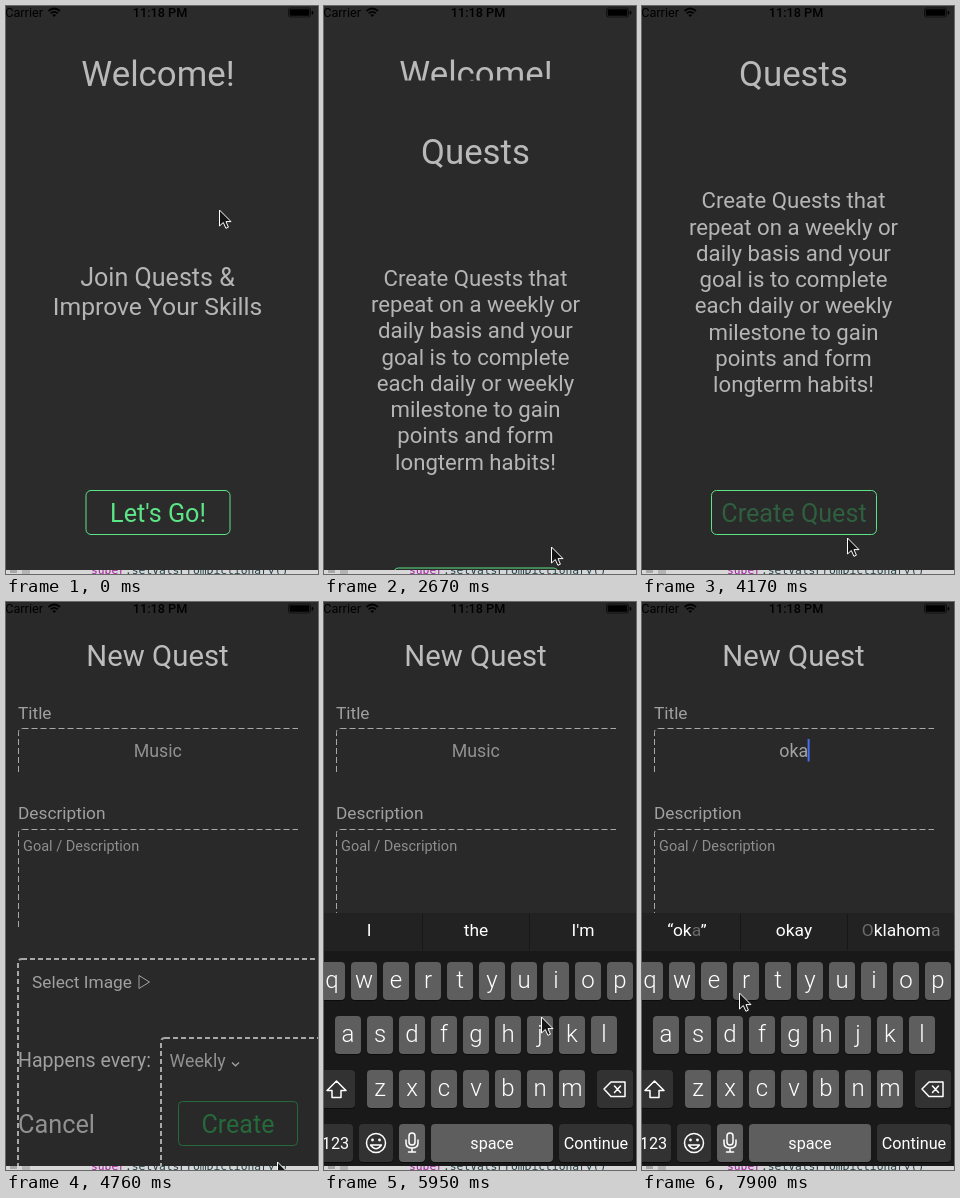
An HTML page for the animation above (8 s loop, 312x568 px).

```html
<!DOCTYPE html>
<html lang="en">
<head>
<meta charset="utf-8">
<title>Quest onboarding</title>
<style>
  html, body { margin: 0; width: 100%; height: 100%; overflow: hidden; background: #2b2b2b; }
  svg { display: block; width: 312px; height: 568px; }
  text { font-family: Roboto, Inter, sans-serif; fill: #b5b5b5; white-space: pre; }
  .mid { text-anchor: middle; }
  .h1 { font-size: 34.8px; fill: #b9b9b9; }
  .h2 { font-size: 29.3px; fill: #bcbcbc; }
  .lead { font-size: 24.7px; }
  .copy { font-size: 22.2px; }
  .label { font-size: 17.3px; fill: #a0a0a0; }
  .field { font-size: 17.8px; fill: #919191; }
  .hint { font-size: 14.5px; fill: #8e8e8e; }
  .button { font-size: 25.2px; fill: #5ce587; }
  .button.dim { fill: #2f5f3e; }
  .frame { fill: none; stroke: #5ce587; }
  .button.off { font-size: 25px; fill: #26693a; }
  .frame.off { fill: none; stroke: #26693a; }
  .thin { fill: none; stroke: #a8a8a8; stroke-dasharray: 6 3; }
  .thick { fill: none; stroke: #a8a8a8; stroke-width: 2; stroke-dasharray: 5 3; }
  .status text { fill: #000; font-size: 12.7px; }
  .key { fill: #5e5e5e; }
  .key.fn { fill: #323232; }
  .cap { fill: #fff; font-size: 24px; font-weight: 300; }
  .word { fill: #fff; font-size: 16.2px; }
  .tip { fill: #fff; font-size: 17.4px; }
  .faint { fill: #6b6b6b; }
  .icon { fill: none; stroke: #fff; stroke-width: 1.5; stroke-linejoin: round; stroke-linecap: round; }
  .code { font: 11.3px "DejaVu Sans Mono", "Liberation Mono", monospace; fill: #24434a; }
</style>
</head>
<body>
<svg viewBox="0 0 312 568">
  <defs>
    <clipPath id="screen"><rect width="312" height="564"/></clipPath>
    <clipPath id="below"><rect y="564" width="312" height="4"/></clipPath>
  </defs>

  <g clip-path="url(#below)">
    <rect y="564" width="312" height="4" fill="#d8d7d8"/>
    <rect x="4" y="564" width="7" height="3" fill="#a8a8a8"/>
    <rect x="16" y="564" width="8" height="4" fill="#b4b4b4"/>
    <text class="code" x="85" y="568"><tspan fill="#a51fa0">super</tspan>.setValsFromDictionary()</text>
  </g>

  <g clip-path="url(#screen)">
    <rect width="312" height="564" fill="#2b2b2b"/>
    <text class="h1 mid" x="152" y="80">Welcome!</text>
    <text class="lead mid" style="font-size:25.100px" x="151.500" y="279.500">Join Quests &amp;</text>
    <text class="lead mid" x="151.500" y="309.300">Improve Your Skills</text>
    <rect class="frame" x="80" y="484.500" width="144" height="44" rx="5"/>
    <text class="button mid" id="go" x="152" y="516">Let's Go!</text>

    <g id="quests">
      <rect x="-7" y="-3" width="320" height="568" fill="#2a2a2a"/>
      <text class="h1 mid" x="151.500" y="80">Quests</text>
      <g id="copy"></g>
      <rect class="frame" x="69.500" y="484.500" width="165" height="44" rx="5"/>
      <text class="button mid" id="add" x="152" y="516">Create Quest</text>
    </g>

    <g id="form">
      <rect x="-7" y="-3" width="320" height="568" fill="#292929"/>
      <text class="h2 mid" x="151.500" y="63.500">New Quest</text>
      <text class="label" x="12" y="117">Title</text>
      <path class="thin" d="M16.500 126.500H292M12.500 170V130.500Q12.500 126.500 16.500 126.500"/>
      <text class="field mid" id="title" x="151.700" y="154.500"></text>
      <rect id="caret" y="137" width="2" height="22.500" fill="#4a6cf0"/>
      <text class="label" x="12" y="217">Description</text>
      <path class="thin" d="M16.500 227.500H292M12.500 325V231.500Q12.500 227.500 16.500 227.500"/>
      <text class="hint" x="17" y="249">Goal / Description</text>
      <path class="thick" d="M16 357H316M12 566V361Q12 357 16 357"/>
      <text class="label" x="26" y="385.700">Select Image</text>
      <path d="M133 373.500V386.500L143.500 380Z" fill="none" stroke="#a0a0a0"/>
      <text class="label" style="font-size:19.500px" x="12" y="465">Happens every:</text>
      <path class="thick" d="M159 436H316M155 566V440Q155 436 159 436"/>
      <text class="field" x="163.500" y="465">Weekly</text>
      <path d="M226 460.500L229.500 463.800L233 460.500" fill="none" stroke="#a0a0a0" stroke-width="1.300"/>
      <text class="field" style="font-size:25.300px" x="12" y="531">Cancel</text>
      <rect class="frame off" x="172.500" y="499.500" width="119" height="44" rx="4"/>
      <text class="button off mid" x="232" y="531">Create</text>

      <g id="board">
        <rect x="-7" y="311" width="320" height="38" fill="#222"/>
        <rect x="-7" y="349" width="320" height="216" fill="#191919"/>
        <path d="M98.500 312V348M205.500 312V348" stroke="#171717"/>
        <g id="tips"></g>
        <g id="keys"></g>
        <path class="icon" d="M12.500 479L22 488.500H17V495.500H8V488.500H3Z"/>
        <path class="icon" d="M280 487L287 480H301V494.500H287ZM290.500 484L296.500 490.500M296.500 484L290.500 490.500"/>
        <circle class="icon" cx="52" cy="541" r="9.500"/>
        <path class="icon" d="M46.500 543Q52 550.500 57.500 543Z"/>
        <circle cx="48.500" cy="538" r="1.400" fill="#fff"/>
        <circle cx="55.500" cy="538" r="1.400" fill="#fff"/>
        <rect class="icon" x="85" y="531" width="6" height="12" rx="3"/>
        <path class="icon" d="M82 538V541Q82 546 88 546T94 541V538M88 546V550M84.500 550H91.500"/>
      </g>
    </g>

    <g class="status">
      <text x="37" y="11" text-anchor="end">Carrier</text>
      <path d="M42.500 5Q48.200 0 54 5M44.600 7.300Q48.200 4.300 51.900 7.300" fill="none" stroke="#000" stroke-width="1.700"/>
      <path d="M46.300 9L48.200 11L50.200 9Q48.200 7.600 46.300 9Z"/>
      <text class="mid" x="154" y="11" font-weight="500">11:18 PM</text>
      <rect x="282.500" y="2" width="22" height="9" rx="2" fill="none" stroke="#000" stroke-width=".6"/>
      <rect x="283.700" y="3.200" width="19.600" height="6.600" rx="1"/>
      <rect x="305.700" y="5" width="1.600" height="3.500" rx=".8"/>
    </g>
  </g>

  <path id="pointer" d="M0 0V16L3.800 12.500L6.400 18.300L8.900 17.200L6.500 11.600H11.500Z" fill="#151515" stroke="#fff"/>
</svg>

<script>
const LOOP = 8000, STEP = 149, LEAD = 12;
const $ = id => document.getElementById(id);

function add(parent, tag, attrs, text) {
  const el = document.createElementNS('http://www.w3.org/2000/svg', tag);
  for (const k in attrs) el.setAttribute(k, attrs[k]);
  if (text) el.textContent = text;
  parent.appendChild(el);
  return el;
}

['Create Quests that', 'repeat on a weekly or', 'daily basis and your', 'goal is to complete',
 'each daily or weekly', 'milestone to gain', 'points and form', 'longterm habits!']
  .forEach((line, i) => add($('copy'), 'text', { class: 'copy mid', x: 151.5, y: 202.4 + i * 26.25 }, line));

function key(x, y, w, label, cls = '', type = 'cap', base = 26) {
  add($('keys'), 'rect', { x, y: y + 1, width: w, height: 38, rx: 4, fill: '#0c0c0c' });
  add($('keys'), 'rect', { class: 'key ' + cls, x, y, width: w, height: 38, rx: 4 });
  if (label) add($('keys'), 'text', { class: type + ' mid', x: x + w / 2, y: y + base }, label);
}
[['qwertyuiop', -5], ['asdfghjkl', 11], ['zxcvbnm', 43]].forEach(([row, x0], r) =>
  [...row].forEach((c, i) => key(x0 + i * 32, 360 + r * 54, 26, c)));
key(-9, 468, 40, '', 'fn');
key(273, 468, 36, '', 'fn');
key(-6, 522, 35, '123', 'fn', 'word', 25);
key(35, 522, 34, '', 'fn');
key(75, 522, 26, '');
key(107, 522, 122, 'space', '', 'word', 24.5);
key(235, 522, 74, 'Continue', 'fn', 'word', 24.5);

const tips = [45, 152, 259].map(x => add($('tips'), 'text', { class: 'tip mid', x, y: 334 }));

// Letters wrapped in ~ are half faded.
function setTip(el, s) {
  if (el.dataset.s === s) return;
  el.dataset.s = s;
  el.textContent = '';
  s.split('~').forEach((part, i) => part && add(el, 'tspan', i % 2 ? { class: 'faint' } : {}, part));
}

// Each entry holds from its step until the next one.
const typed = [[0, ''], [45, 'o'], [48, 'ok'], [52, 'oka']];
const words = [
  [0, ['I', 'the', "I'm"]],
  [46, ['~I~', '~d:~he', "I'~m~"]],
  [47, ['“o”', 'of', 'on']],
  [49, ['“ok”', 'okay', 'okey']],
  [53, ['“ok~a~”', 'okay', '~O~klahom~a~']]
];
const held = (list, n) => list.filter(e => e[0] <= n).pop()[1];

const path = [
  [0, 213.5, 204], [3, 201, 187], [4, 206, 195], [7, 245, 216], [10, 296, 274], [12, 296, 274],
  [14, 255, 450], [15, 229, 508], [16, 225, 530], [18, 227.5, 541], [20, 240, 548], [22, 284, 552],
  [23, 292, 548], [26, 205.5, 532], [28, 205.5, 532], [30, 225, 545], [32, 271.5, 560], [33, 260, 450],
  [35, 185, 165], [36, 180, 160], [38, 192.5, 414], [39, 200, 425], [41, 235, 405], [43, 258, 388],
  [45, 262, 380], [46, 248.5, 407], [48, 246, 438], [50, 90, 440], [52, 22, 438], [53, 97.5, 391]
];
function along(n) {
  const i = Math.max(1, path.findIndex(p => p[0] >= n));
  const [a, ax, ay] = path[i - 1], [b, bx, by] = path[i];
  const k = (n - a) / (b - a);
  return [ax + (bx - ax) * k, ay + (by - ay) * k];
}

const bez = (s, a, b) => 3 * (1 - s) ** 2 * s * a + 3 * (1 - s) * s * s * b + s ** 3;
function ease(x) {
  if (x <= 0) return 0;
  if (x >= 1) return 1;
  let lo = 0, hi = 1;
  for (let i = 0; i < 24; i++) {
    const m = (lo + hi) / 2;
    if (bez(m, .38, .125) < x) lo = m; else hi = m;
  }
  return bez(lo, .7, 1);
}
function slide(id, t, start, height) {
  const left = 1 - ease((t - start) / 500);
  $(id).setAttribute('transform', `translate(0 ${(height * left).toFixed(2)})`);
}

function draw(now) {
  const n = Math.min(53, Math.floor((now % LOOP + LEAD + 2) / STEP));
  const t = n * STEP - LEAD;

  slide('quests', t, 2473, 568);
  slide('form', t, 4215, 568);
  slide('board', t, 5418, 254);
  $('go').classList.toggle('dim', n >= 16);
  $('add').classList.toggle('dim', n >= 26);

  const text = held(typed, n), title = $('title');
  title.textContent = text || 'Music';
  title.style.fill = text ? '#a3a3a3' : '';
  const half = title.getComputedTextLength() / 2;
  $('caret').setAttribute('x', 151.2 + (text ? half : -half - .8));
  $('caret').style.opacity = n < 36 || (n >= 40 && n < 43) ? 0 : 1;
  held(words, n).forEach((w, i) => setTip(tips[i], w));

  $('pointer').setAttribute('transform', `translate(${along(n)})`);
}

const origin = performance.now();
function tick() {
  draw(performance.now() - origin);
  requestAnimationFrame(tick);
}
tick();
</script>
</body>
</html>
```
